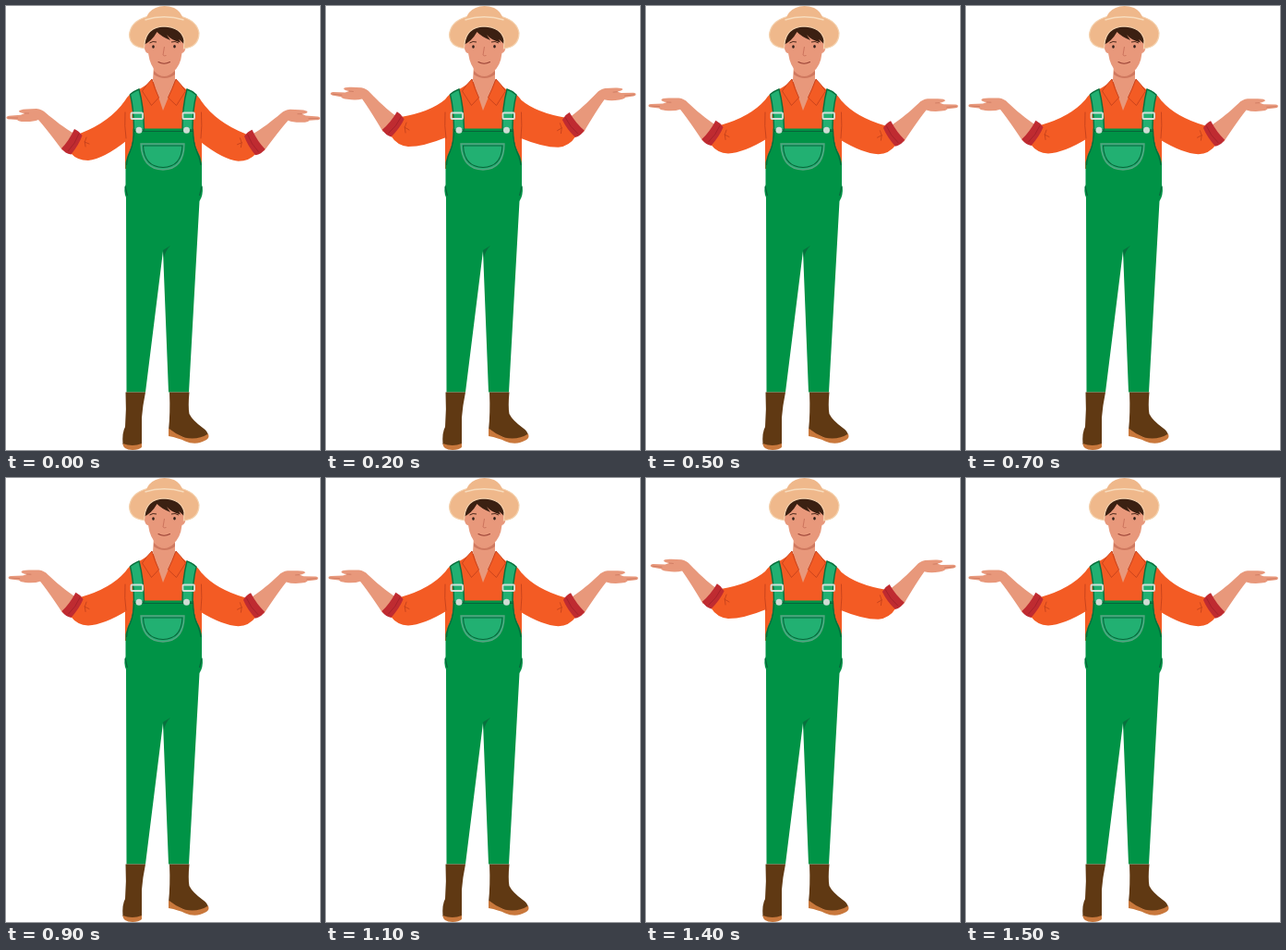
These frames come from a looping animation (340x480 px, 1.6 s). An HTML page:

```html
<!DOCTYPE html>
<html lang="en">
<head>
<meta charset="utf-8">
<title>Farmer raising his arms</title>
<style>
html, body { margin: 0; width: 100%; height: 100%; overflow: hidden; background: #fff; }
svg { display: block; width: 340px; height: 480px; }
.skin { fill: #e8987b; }
.shirt { fill: #f35b24; }
.crease { fill: none; stroke: #c5411c; stroke-width: .9; stroke-linecap: round; }
.collar { fill: #f35b24; stroke: #c5411c; stroke-width: .9; stroke-linejoin: round; }
.seam { fill: none; stroke: #08653a; stroke-width: 1.1; }
.strap { fill: #22b072; stroke: #08713e; stroke-width: 1.4; }
.boot { fill: #603913; }
.sole { fill: #c9783c; }
.buckle { fill: none; stroke: #d3dfd8; stroke-width: 1.8; }
</style>
</head>
<body>
<svg viewBox="0 0 340 480">
  <defs>
    <g id="arm">
      <g id="forearm">
        <path class="skin" d="M75 138.500 C63 132 52 123 43 115.500 Q39 111.500 33 111 L22 111.500 Q14 112 14 114 Q15 115.500 20 116 L16 117.800 L3 118.800 Q0 119.500 .5 121 Q1 122.500 5 122.500 L12 123 Q14 125 19 125 Q29 125.500 35 123 Q44 133 61 156 Z"/>
        <path d="M2 121 L13 121 M20 116 L25 116" fill="none" stroke="#c9755d" stroke-width=".7"/>
      </g>
      <path class="shirt" id="sleeve"/>
      <path class="crease" id="fold"/>
      <g id="cuff">
        <path fill="#bf2b31" d="M74 133 Q79 135 82.500 140 Q79 150 70.500 160.500 Q64 159.500 60 154 Q68 146 74 133 Z"/>
        <path d="M79 138 Q75 149 67 157" fill="none" stroke="#a02029" stroke-width=".8"/>
      </g>
    </g>
  </defs>

  <use href="#arm"/>
  <use href="#arm" transform="translate(340.500 .7) scale(-1 1)"/>

  <!-- shirt -->
  <path class="shirt" d="M157 82 L146 89 Q136 93 132 99 Q127 111 129 145 L129 176 H212 L212 145 Q214 111 208 98 Q204 94 195 90 L183 80 Z"/>
  <path class="crease" d="M129 115 Q128 130 130 143 M211.500 115 Q212.500 130 211 143"/>

  <!-- trousers and bib -->
  <path fill="#009346" d="M137.500 132.500 H203 Q203 148 207 156 Q211 163 212 170 V193 Q214 200 211.500 207 L209.500 211 L198 417.500 H176 L170 265 L151 417.500 H130.500 L130 207 Q127 200 129.500 193 V169 Q131 162 134 156 Q138 148 137.500 132.500 Z"/>
  <path fill="#08713e" d="M170 264 L178 259 Q173 264 171 272 Z"/>
  <path class="seam" d="M138 135.500 H203 M138.500 133 Q138.500 148 134.500 157 Q131 164 130.500 172 M202.500 133 Q202.500 148 206.500 157 Q210 164 211 172 M129 195 L131.500 205 M212 195 L209.500 205"/>

  <!-- straps -->
  <path class="strap" d="M134.500 95.500 Q139 92 144 90 Q149 108 149.500 134 H138.500 Q138.500 112 134.500 95.500 Z"/>
  <path class="strap" d="M196 90 Q202 92 206 96 Q202 112 202 134 H191 Q191 108 196 90 Z"/>
  <g class="buckle">
    <rect x="135.500" y="115.500" width="12.500" height="6.500" rx="1"/>
    <rect x="191.500" y="115.500" width="12.500" height="6.500" rx="1"/>
  </g>
  <g fill="#cfdcd4"><circle cx="144" cy="134.300" r="3.500"/><circle cx="195.500" cy="134.300" r="3.500"/></g>

  <!-- pocket -->
  <path d="M146 149 H193 Q193 176.500 170 177 Q147 176.500 146 149 Z" fill="#22b072" stroke="#58a583" stroke-width="1.300"/>
  <path class="seam" d="M148.500 151 H191 Q190 174 170 174.500 Q149.500 174 148.500 151 Z"/>

  <!-- boots -->
  <path class="boot" d="M129.500 417.500 H151 Q148 432 147 445 V474 Q138 479 126.500 474 Q125.500 461 129 455 Q130.500 436 129.500 417.500 Z"/>
  <path class="sole" d="M126.500 473 Q137 477 147 473 V477 Q144 480 137 480 Q126.500 480 126.500 473 Z"/>
  <path class="boot" d="M177 417.500 H198.500 Q197 433 198.500 441 Q202 448 213 456 Q219 460 219 465 Q208 472 196 468 Q185 464 176 459 Q178 440 177 417.500 Z"/>
  <path class="sole" d="M176 456.500 Q184 463 193 466.500 Q207 470 219 462.500 Q220.500 467 217 469 Q206 475.500 194 470.500 Q187 467 176 465 Z"/>

  <!-- neck and collar -->
  <path class="skin" d="M160 64 H183 V81 L170 113 L159 80 Z"/>
  <path fill="#cf785f" d="M160 70 Q171 82 183 70 V74 Q172 82 160 74 Z"/>
  <path class="collar" d="M158 79 Q152 85 147.500 92 L157.500 107.500 L165.500 99 Q161 90 158 79 Z"/>
  <path class="collar" d="M184 79 Q190 85 194.500 92 L184.500 107.500 L175.500 99 Q180 90 184 79 Z"/>

  <!-- head -->
  <path class="skin" d="M151 38 Q148 41 150 46 Q151 51 154 51 Q156 65 163 71 Q172 79 181 71 Q189 65 190.500 51 Q194 50 194.500 45 Q195 40 192 37 L187 24 H157 Z"/>
  <path fill="#3b2012" d="M149 42 Q147 27 158 20 H186 Q195 27 193 41.500 Q190 38 187 36 L189 39.500 Q179 37 174 31 L178 37 Q168 33 163.500 28 Q158 38 149 42 Z"/>
  <g fill="#32211b"><ellipse cx="159.500" cy="44" rx="1.300" ry="1.800"/><ellipse cx="182.500" cy="43.700" rx="1.300" ry="1.800"/></g>
  <path d="M155.500 40 Q159 37.500 163 39 M179 39 Q183 37.500 187 40" fill="none" stroke="#4b281a" stroke-width="1"/>
  <path d="M171.500 44 L170 53 Q171.500 54.500 173.500 53.500" fill="none" stroke="#c9705a" stroke-width=".9"/>
  <path d="M165 60.500 Q171 64 177.500 60.500" fill="none" stroke="#963e32" stroke-width="1.100" stroke-linecap="round"/>

  <!-- hat -->
  <path fill="#efb88b" stroke="#f5d2ae" stroke-width="1.200" d="M133.500 31 Q135 17 151 12 Q171 7 192 12 Q207 17 209 29 Q209 44 192.500 46 L193 37 Q190 23 171 22 Q152 23 150 41 L149.500 45.500 Q134 44 133.500 31 Z"/>
  <path fill="#efb88b" d="M151 15 Q154 5 162 2 Q171 -2 182 2 Q190 6 192 15 Q171 9 151 15 Z"/>
  <path d="M150.500 15 Q171 8.500 192.500 15" fill="none" stroke="#f7dcbd" stroke-width="1.500"/>
</svg>
<script>
const $ = id => document.getElementById(id);
const STEP = 100;
const LIFTS = [0, .5, 1, .5];

const mix = (a, b, u) => a + (b - a) * u;

function pose(u) {
  const y = (low, high) => mix(low, high, u).toFixed(2);
  const swing = `translate(${1.5 * u} ${-19 * u}) rotate(${5.8 * u} 71 147)`;
  $('forearm').setAttribute('transform', swing);
  $('cuff').setAttribute('transform', swing);
  $('sleeve').setAttribute('d',
    `M140 92 Q133 95 129 ${y(102, 101)} Q113 ${y(125, 114.5)} 81 ${y(137.5, 120)}` +
    ` L70 ${y(159, 140)} Q77 ${y(167, 151)} 89 ${y(167, 152)}` +
    ` Q106 ${y(165, 152)} 130 ${y(146, 142)} L140 140 Z`);
  $('fold').setAttribute('d',
    `M87 ${y(142, 126)} Q84 ${y(147, 131)} 86 ${y(152, 137)} M85 ${y(147, 131)} L90 ${y(149, 134)}`);
}

const start = performance.now();

function frame() {
  const t = performance.now() - start;
  pose(LIFTS[Math.floor(t / STEP) % LIFTS.length]);
  requestAnimationFrame(frame);
}
frame();
</script>
</body>
</html>
```
